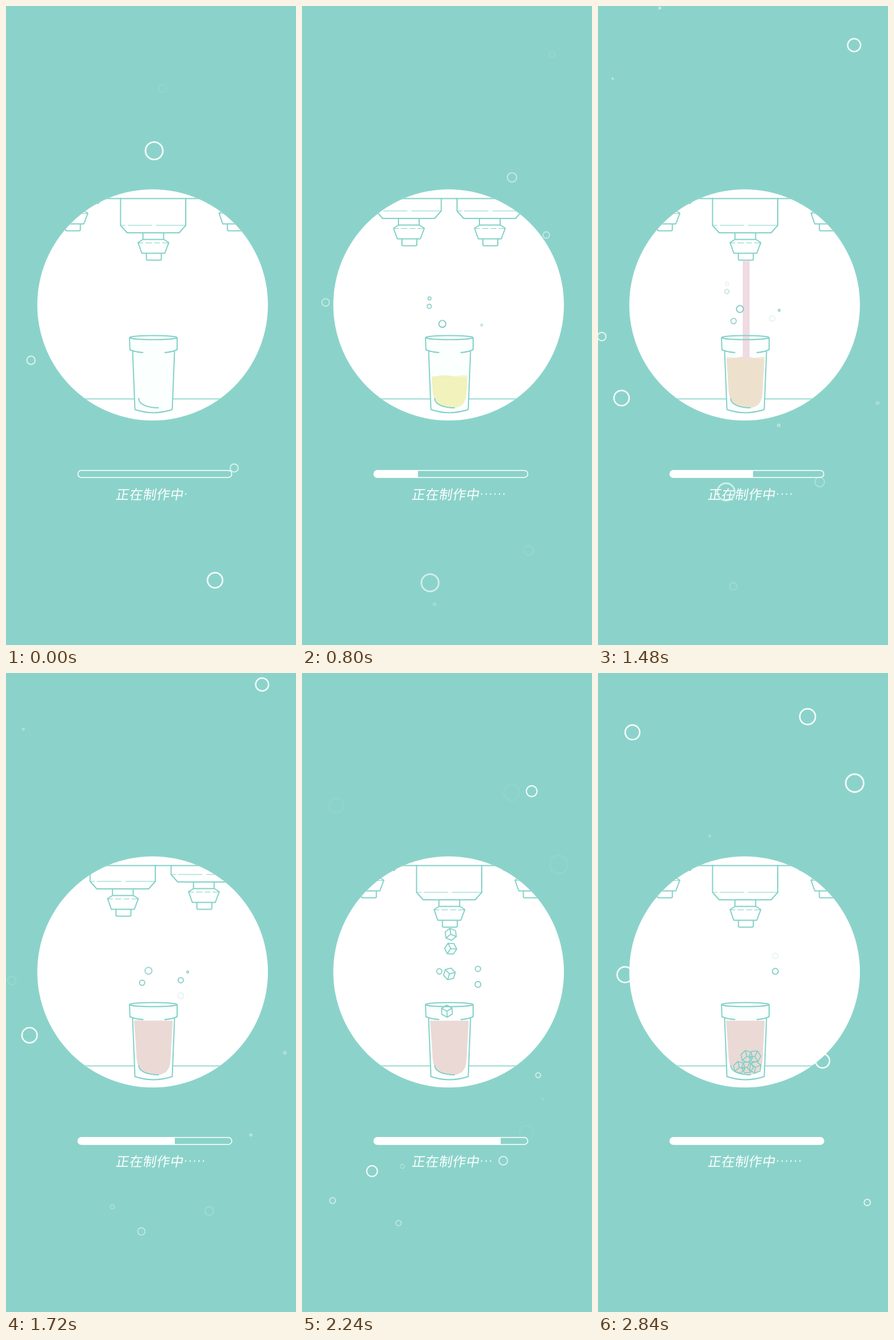
Write an HTML page with a canvas that moves like this. It is 505 px wide and 1110 px high and loops after 2.88 s.

```html
<!DOCTYPE html>
<html lang="zh">
<head>
<meta charset="utf-8">
<style>
html, body { margin: 0; width: 100%; height: 100%; overflow: hidden; background: #8bd3ca; }
canvas { display: block; }
</style>
</head>
<body>
<canvas id="stage" width="505" height="1110"></canvas>
<script>
const g = document.getElementById('stage').getContext('2d');
const LOOP = 2880, STEP = 40, BG = '#8bd3ca', TEAL = '#82d1c7', PITCH = 141;
const clamp = (v, a = 0, b = 1) => Math.min(b, Math.max(a, v));
const lerp = (a, b, k) => a + (b - a) * k;
const ramp = (t, a, b) => clamp((t - a) / (b - a));
const smooth = (t, a, b) => { const k = ramp(t, a, b); return k * k * (3 - 2 * k); };
const rand = (i, k) => { const v = Math.sin(i * 127.1 + k * 311.7) * 43758.5453; return v - Math.floor(v); };

const disc = new Path2D();
disc.arc(255.3, 519.2, 200.8, 0, 7);
const nozzle = {
  body: new Path2D('M199.5 330V381L211 394H301.5L313 381V330M238.5 394V405.5M274.5 394V405.5' +
    'M238.5 405.5H275L283.5 411L276.5 429.5H236.5L230 411ZM244.5 430V439Q244.5 441.5 247 441.5H268Q270.5 441.5 270.5 439V430'),
  seams: new Path2D('M199 381H208M212 381H254M261 381H313M231 411.5H239M243 411.5H254M258 411.5H268M272 411.5H283')
};
const cup = {
  fill: new Path2D('M215 576L216 597L220.5 600L224.5 701Q257 712 289.5 701L293.5 600L297.5 597L298 576Z'),
  lines: new Path2D('M220.5 600L224.5 701Q257 712 289.5 701L293.5 600' +
    'M215 576A41.5 3.5 0 0 1 298 576A41.5 3.5 0 0 1 215 576L215.8 597Q224 601 239 602M298 576V597Q290 601 276 602'),
  shine: new Path2D('M231 681C231 692 246 698 266 698'),
  inside: new Path2D('M223 600L227.8 670C229 690 244 698 262 698C277 698 284.5 690 286 676L290.5 600Z')
};

function stroke(path, width, color = TEAL) {
  g.strokeStyle = color;
  g.lineWidth = width;
  g.stroke(path);
}

// A rising ring that is at (x, y) in the middle of its life
function bubble(t, [mid, x, y, r], { speed, life, fade, drift = 0, alpha = .9, color = '#fff' }) {
  const age = t - mid, s = age / 1000;
  if (Math.abs(age) >= life) return;
  g.globalAlpha = alpha * clamp((life - Math.abs(age)) / fade);
  const ring = new Path2D(), width = 1.2 + r * .1;
  ring.arc(x + drift * s, y - speed * s, r - width / 2, 0, 7);
  stroke(ring, width, color);
  g.globalAlpha = 1;
}

// Middle time, x, y, radius
const large = [
  [-140, 258, 284, 16.5], [160, 364, 963, 14.5], [1140, 223, 923, 16.5], [1480, 41, 681, 14.5],
  [1700, 446, 24, 12.5], [2220, 400, 209, 10.5], [2220, 122, 869, 10.5], [2680, 60, 137, 14],
  [2680, 447, 229, 17], [2680, 391, 707, 13.5], [2680, 365, 111, 15], [2840, 47, 524, 15]
];
const drops = [
  [800, 222, 508, 3.5], [900, 222, 518, 4.5], [1200, 246, 537, 7], [1360, 315, 533, 2.5],
  [1960, 238, 529, 5.5], [2160, 306, 517, 5.5], [2400, 307, 535, 6]
];
const SMALL = 32;

function outerBubbles(t) {
  for (const b of large) bubble(t, b, { speed: 100 + 8 * b[3], life: 450, fade: 160 });
  for (let i = 0; i < SMALL; i++) {
    const r = 2 + 8 * rand(i, 1) ** 1.3;
    bubble(t, [i * LOOP / SMALL, 505 * rand(i, 2), 30 + 980 * rand(i, 3), r], {
      speed: 100 + 8 * r, life: 400, fade: 200, drift: 50 * (rand(i, 4) - .5), alpha: .4 + .5 * rand(i, 5)
    });
  }
}

function innerBubbles(t) {
  for (const b of drops) bubble(t, b, { speed: 38, life: 750, fade: 300, drift: 4, alpha: 1, color: '#84cbc2' });
}

function machine(t) {
  const turn = smooth(t, 680, 920) + smooth(t, 1620, 1860);
  g.save();
  g.beginPath();
  g.rect(0, 333.5, 505, 400);
  g.clip();
  for (let i = -1; i < 4; i++) {
    const dx = (i - turn) * PITCH;
    g.save();
    g.translate(dx, -Math.floor(Math.abs(dx) * 51 / PITCH));
    stroke(nozzle.body, 2);
    stroke(nozzle.seams, 1.2);
    g.restore();
  }
  g.restore();
  g.fillStyle = TEAL;
  g.fillRect(50, 333.5, 410, 2);
}

function pour(t, from, to, color, level) {
  const at = time => 442 + Math.max(0, t - time) * 2.2;
  const top = at(to), bottom = Math.min(at(from), level + 3);
  g.fillStyle = color;
  if (bottom > top) g.fillRect(252, top, 12, bottom - top);
}

function liquid(t, level) {
  if (t < 240) return;
  const amp = 2 * (1 - smooth(t, 1480, 1840)), mix = ramp(t, 1000, 1700);
  g.save();
  g.clip(cup.inside);
  g.fillStyle = `rgb(${lerp(241, 235, mix)}, ${lerp(242, 217, mix)}, ${lerp(188, 214, mix)})`;
  for (const [alpha, phase] of [[.7, Math.PI], [1, 0]]) {
    g.globalAlpha = alpha;
    g.beginPath();
    g.moveTo(220, 705);
    for (let x = 220; x <= 294; x += 2) g.lineTo(x, level + amp * Math.sin(x / 10.7 + t / 120 + phase));
    g.lineTo(294, 705);
    g.fill();
  }
  g.restore();
}

// Five cubes drop into a leaning stack, then slump into two rows
function ice(t) {
  const slump = smooth(t, 2520, 2840);
  for (let i = 0; i < 5; i++) {
    const k = ramp(t, 2040 + i * 50, 2300 + i * 50), row = Math.floor(i / 3);
    if (!k) continue;
    const x = lerp(lerp(257, 251 + 5.5 * i, k), 246 + 14 * (i % 3) + 13 * row, slump);
    const y = lerp(lerp(446, 685 - 8.5 * i, k * k), 685 - 19 * row, slump);
    const corner = n => {
      const a = n * Math.PI / 3 + i * .7 + k * 2 + slump * .4;
      return [x + 10.5 * Math.cos(a), y + 10.5 * Math.sin(a)];
    };
    const path = new Path2D();
    for (let n = 0; n < 6; n++) path.lineTo(...corner(n));
    path.closePath();
    for (let n = 0; n < 6; n += 2) {
      path.moveTo(x, y);
      path.lineTo(...corner(n));
    }
    stroke(path, 1.8);
  }
}

function status(t) {
  const bar = new Path2D();
  bar.roundRect(125.2, 806.7, 268, 12.2, 6);
  g.save();
  g.clip(bar);
  g.fillStyle = '#fff';
  g.fillRect(122, 800, t / 10, 24);
  g.restore();
  stroke(bar, 1.5, '#fff');

  g.save();
  g.fillStyle = '#fff';
  g.transform(1, 0, -.17, 1, 190.5, 857);
  g.font = '350 23px "Noto Sans CJK SC", "Noto Sans CJK", sans-serif';
  g.letterSpacing = '0.6px';
  g.fillText('正在制作中', 0, 0);
  g.restore();
  g.fillStyle = '#fff';
  g.font = '18px "Noto Sans", sans-serif';
  g.textAlign = 'center';
  const dots = Math.floor(t / 160) % 6 + 1;
  for (let i = 0; i < dots; i++) g.fillText('.', 313 + i * 7.75, 849.3);
  g.textAlign = 'left';
}

function draw(t) {
  const level = 702 - 20 * ramp(t, 270, 320) - 38.5 * ramp(t, 320, 680) - 39.5 * ramp(t, 1040, 1580);
  g.fillStyle = BG;
  g.fillRect(0, 0, 505, 1110);
  outerBubbles(t);
  g.fillStyle = '#fff';
  g.fill(disc);

  g.save();
  g.clip(disc);
  g.fillStyle = '#9adad1';
  g.fillRect(50, 681.5, 410, 2);
  machine(t);
  g.fillStyle = '#fbfffe';
  g.fill(cup.fill);
  liquid(t, level);
  pour(t, 200, 560, '#f8f9c6', level);
  pour(t, 1000, 1520, '#efdbe1', level);
  ice(t);
  stroke(cup.lines, 2);
  stroke(cup.shine, 2);
  innerBubbles(t);
  g.restore();

  status(t);
}

g.lineJoin = 'round';
const start = performance.now();
function frame(now) {
  const t = Math.max(0, now - start) % LOOP;
  draw(Math.floor(t / STEP) * STEP);
  requestAnimationFrame(frame);
}
draw(0);
requestAnimationFrame(frame);
</script>
</body>
</html>
```
